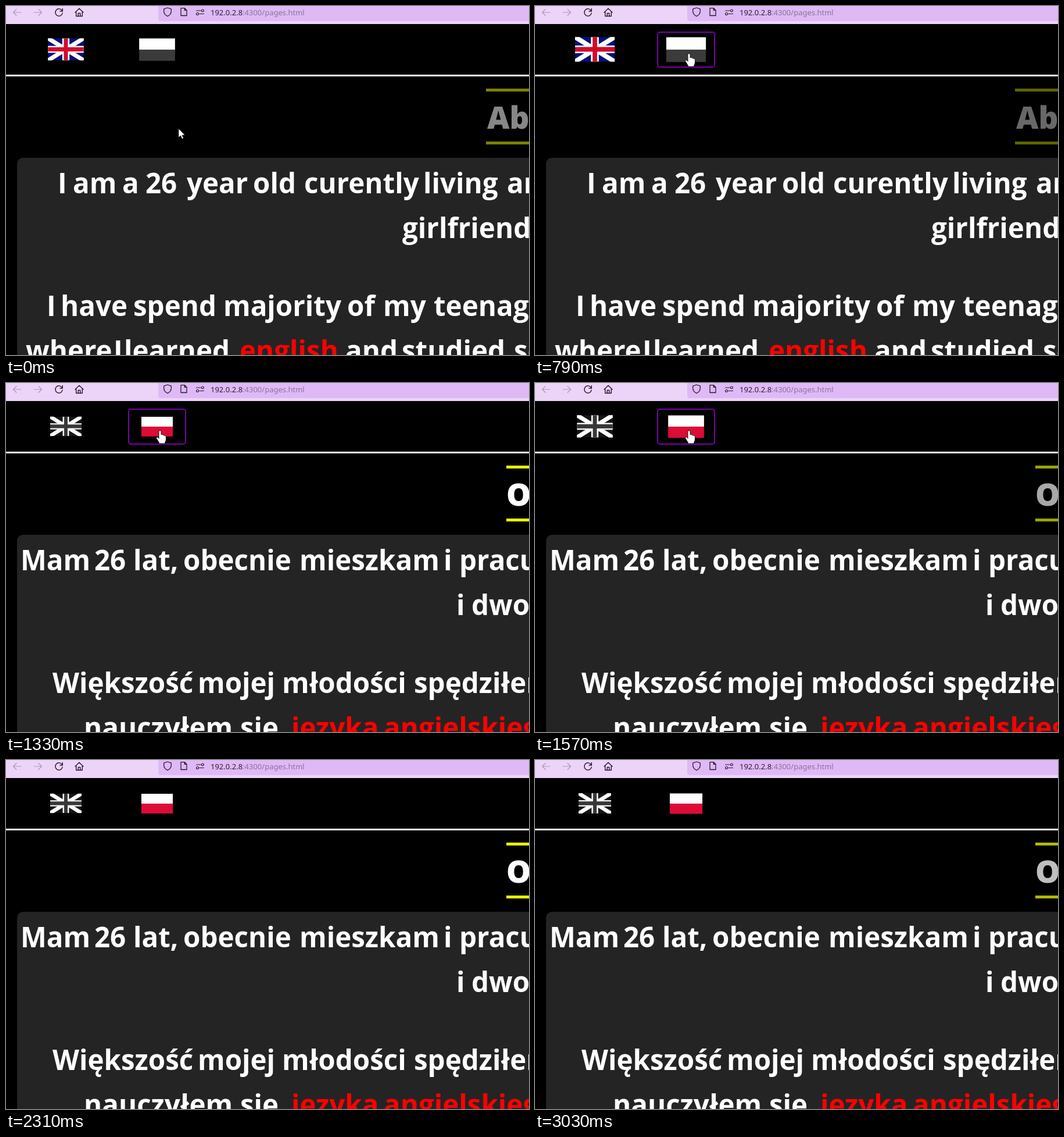
Recreate the animation shown at these times as an HTML page with a canvas. Size 900 by 600 pixels, loop 3.05 s.

```html
<!DOCTYPE html>
<html lang="en">
<head>
<meta charset="utf-8">
<title>Language switch</title>
<style>
  html, body { margin: 0; width: 100%; height: 100%; overflow: hidden; background: #000; }
  canvas { display: block; }
</style>
</head>
<body>
<canvas id="stage" width="900" height="600"></canvas>
<script>
const ctx = document.getElementById('stage').getContext('2d');
const LOOP = 3050, PULSE = 970;
const SWITCH = 1050, FADE_START = 1090, FADE = 240;
const BUTTON = { x: 211, y: 45, w: 98, h: 60 };
const BODY_FONT = '700 47.5px "Open Sans", "Noto Sans", sans-serif';
const HEAD_FONT = '800 53px "Open Sans", "Noto Sans", sans-serif';
const URL_FONT = '13px "Noto Sans", "Open Sans", sans-serif';

// Each line: baseline, then word and left edge pairs; "*" marks a highlight.
const PAGES = {
  en: {
    title: 'About', left: 826,
    lines: [
      [322, 'I', 93, 'am', 117, 'a', 202, '26', 241, 'year', 311, 'old', 427, 'curently', 515, 'living', 721, 'and', 864],
      [399, 'girlfriend', 682],
      [533, 'I', 74, 'have', 97, 'spend', 221, 'majority', 377, 'of', 589, 'my', 652, 'teenage', 737],
      [610, 'where', 34, 'I', 189, 'learned', 206, '*english', 404, 'and', 586, 'studied', 683, 'some', 876]
    ]
  },
  pl: {
    title: 'O mnie', left: 861,
    lines: [
      [322, 'Mam', 29, '26', 153, 'lat,', 222, 'obecnie', 307, 'mieszkam', 508, 'i', 756, 'pracuję', 783],
      [399, 'i', 778, 'dwoma', 803],
      [533, 'Większość', 80, 'mojej', 333, 'młodości', 478, 'spędziłem', 704],
      [610, 'nauczyłem', 137, 'się', 405, '*języka', 487, '*angielskiego', 652]
    ]
  }
};

// time, x, y of the pointer tip
const PATH = [[0, 297, 211], [300, 272, 152], [520, 265, 82], [1880, 265, 82], [2180, 910, 330]];

const clamp = v => Math.max(0, Math.min(1, v));
const wave = (t, peak) => (1 + Math.cos(2 * Math.PI * (t / PULSE - peak))) / 2;

function rect(x, y, w, h, color) {
  ctx.fillStyle = color;
  ctx.fillRect(x, y, w, h);
}

function word(text, x, y, font, color) {
  ctx.font = font;
  ctx.fillStyle = color;
  ctx.fillText(text, x + ctx.measureText(text).actualBoundingBoxLeft, y);
}

function shape(d, x, y, fill, stroke, width = 1) {
  ctx.save();
  ctx.translate(x, y);
  const path = new Path2D(d);
  if (fill) { ctx.fillStyle = fill; ctx.fill(path); }
  if (stroke) {
    ctx.strokeStyle = stroke;
    ctx.lineWidth = width;
    ctx.lineCap = ctx.lineJoin = 'round';
    ctx.stroke(path);
  }
  ctx.restore();
}

// Blend a colour with its grey; 1 keeps the full colour.
function tint([r, g, b], amount) {
  const grey = 0.2126 * r + 0.7152 * g + 0.0722 * b;
  const mix = [r, g, b].map(c => Math.round(grey + (c - grey) * amount));
  return `rgb(${mix})`;
}

function drawToolbar() {
  rect(0, 0, 900, 31, '#ecd4f9');
  ctx.fillStyle = '#dfb9f6';
  ctx.beginPath();
  ctx.roundRect(262, -10, 660, 36, 4);
  ctx.fill();
  const ink = '#24182b', pale = '#ab98b5';
  shape('M7 0H-6M-1 -5.5L-6.5 0L-1 5.5', 19, 11, null, pale, 1.2);
  shape('M-7 0H6M1 -5.5L6.5 0L1 5.5', 55, 11, null, pale, 1.2);
  shape('M5.5 -3A6.2 6.2 0 1 0 6.2 1M6.3 -6.5V-2H2', 91, 11, null, ink, 1.4);
  shape('M-7 0L0 -6.7L7 0M-5.3 -1V6.5H5.3V-1M-1.7 6.5V1.5H1.7V6.5', 126, 11, null, ink, 1.4);
  shape('M0 -7L6.3 -4.8V-1C6.3 3 3.5 6 0 7.6C-3.5 6 -6.3 3 -6.3 -1V-4.8Z', 278, 10, null, ink, 1.3);
  shape('M-5 -6.3H1.5L5 -2.8V6.5H-5ZM1.3 -6V-2.6H5', 306, 10, null, ink, 1.3);
  shape('M-6.5 -2.5H1M-1 3H6.5M6.4 -2.5A2 2 0 1 1 2.4 -2.5A2 2 0 1 1 6.4 -2.5M-2.4 3A2 2 0 1 1 -6.4 3A2 2 0 1 1 -2.4 3',
    334, 10.5, null, ink, 1.2);
  const host = '192.0.2.8';
  ctx.font = URL_FONT;
  ctx.fillStyle = '#2b1d33';
  ctx.fillText(host, 352, 16);
  const w = ctx.measureText(host).width;
  ctx.fillStyle = '#8d729b';
  ctx.fillText(':4300/pages.html', 352 + w, 16);
}

function drawUnionFlag(cx, cy, w, amount) {
  const h = w * 0.62;
  const red = tint([210, 12, 42], amount);
  ctx.save();
  ctx.translate(cx, cy);
  ctx.scale(w / 60, h / 40);
  ctx.beginPath();
  ctx.rect(-30, -20, 60, 40);
  ctx.clip();
  rect(-30, -20, 60, 40, tint([0, 18, 120], amount));
  ctx.strokeStyle = '#fff';
  ctx.lineWidth = 7.5;
  ctx.beginPath();
  ctx.moveTo(-33, -22); ctx.lineTo(33, 22);
  ctx.moveTo(-33, 22); ctx.lineTo(33, -22);
  ctx.stroke();
  rect(-6, -20, 12, 40, '#fff');
  rect(-30, -6.2, 60, 12.4, '#fff');
  rect(-3.4, -20, 6.8, 40, red);
  rect(-30, -3.8, 60, 7.6, red);
  ctx.restore();
}

function drawTwoBandFlag(cx, cy, w, amount) {
  const h = w * 0.625;
  rect(cx - w / 2, cy - h / 2, w, h / 2, '#fff');
  rect(cx - w / 2, cy, w, h / 2, tint([220, 12, 54], amount));
}

function drawHeading(page, glow) {
  const level = c => Math.round(c * glow);
  const bar = `rgb(${level(232)},${level(248)},0)`;
  rect(page.left, 142, 900 - page.left, 5, bar);
  rect(page.left, 233, 900 - page.left, 5, bar);
  const grey = level(255);
  word(page.title, page.left + 2, 211, HEAD_FONT, `rgb(${grey},${grey},${grey})`);
}

function drawCard(page) {
  ctx.fillStyle = '#242424';
  ctx.beginPath();
  ctx.roundRect(19, 261, 1000, 500, 10);
  ctx.fill();
  for (const [y, ...words] of page.lines) {
    for (let i = 0; i < words.length; i += 2) {
      const marked = words[i][0] === '*';
      word(marked ? words[i].slice(1) : words[i], words[i + 1], y, BODY_FONT, marked ? '#ff0000' : '#fff');
    }
  }
}

function pointerAt(t) {
  for (let i = 1; i < PATH.length; i++) {
    const [t0, x0, y0] = PATH[i - 1], [t1, x1, y1] = PATH[i];
    if (t < t1) {
      const k = (t - t0) / (t1 - t0);
      return [x0 + (x1 - x0) * k, y0 + (y1 - y0) * k];
    }
  }
  return null;
}

function drawPointer([x, y], hand) {
  if (hand) {
    shape('M-2 11V1.6C-2 -0.6 2 -0.6 2 1.6V7C3 5.9 5 6.2 5.2 7.8C6.3 6.9 7.8 7.4 8 8.8C9.2 8.2 10.4 9 10.4 10.5V15C10.4 18 8.5 19 8.5 22H-1.5C-1.5 19.5 -4 17 -6 13.5C-7 11.5 -4.7 10.2 -3.3 11.6L-2 13Z',
      x, y, '#fff', '#000', 0.8);
  } else {
    shape('M0 0V15.5L3.6 12.2L6 17.8L8.6 16.7L6.2 11.3H11Z', x, y, '#fff', '#000', 0.8);
  }
}

function draw(t) {
  const page = t < SWITCH ? PAGES.en : PAGES.pl;
  const polish = clamp((t - FADE_START) / FADE);
  const flagWidth = 54 + 14.2 * Math.pow(wave(t, 0.81), 1.6);
  const pointer = pointerAt(t);
  const over = pointer && pointer[0] > BUTTON.x && pointer[0] < BUTTON.x + BUTTON.w &&
    pointer[1] > BUTTON.y && pointer[1] < BUTTON.y + BUTTON.h;

  rect(0, 0, 900, 600, '#000');
  drawToolbar();
  rect(0, 118, 900, 3, '#fff');
  drawUnionFlag(103, 74.5, flagWidth, 1 - polish);
  drawTwoBandFlag(260, 75, flagWidth, polish);
  if (over) {
    ctx.strokeStyle = '#7a02a8';
    ctx.lineWidth = 2;
    ctx.beginPath();
    ctx.roundRect(BUTTON.x, BUTTON.y, BUTTON.w, BUTTON.h, 4);
    ctx.stroke();
  }
  drawHeading(page, 1 - 0.6 * wave(t, 0.848));
  drawCard(page);
  if (pointer) drawPointer(pointer, over);
}

const start = performance.now();
function tick() {
  draw((performance.now() - start) % LOOP);
  requestAnimationFrame(tick);
}
tick();
</script>
</body>
</html>
```
